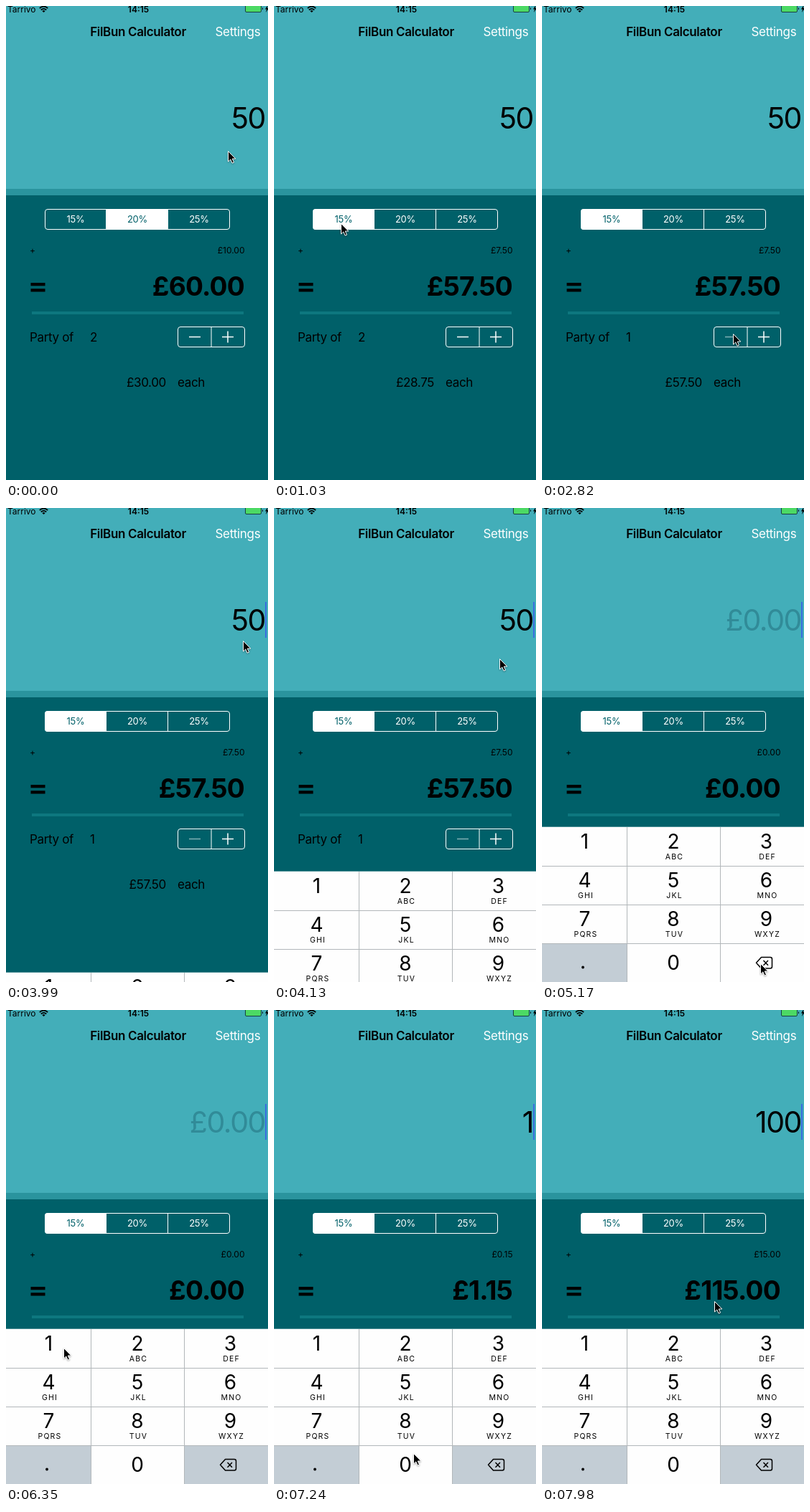
These frames come from a looping animation (365x661 px, 8 s). An HTML page:

```html
<!DOCTYPE html>
<html lang="en">
<head>
<meta charset="utf-8">
<title>Tip calculator</title>
<style>
  html, body { margin: 0; width: 100%; height: 100%; overflow: hidden; background: #006069; }
  svg { display: block; width: 365px; height: 661px; }
  text { font-family: Inter, Roboto, sans-serif; font-size: 17px; letter-spacing: -.02em; white-space: pre; }
  .small { font-size: 12px; letter-spacing: 0; }
  .semi { font-weight: 600; }
  .mid { text-anchor: middle; }
  .end { text-anchor: end; }
  .seg text { font-size: 13px; fill: #fff; }
  .seg .on rect { fill: #fff; }
  .seg .on text { fill: #006069; }
  .line { fill: none; stroke: #fff; }
  #bill { font-size: 41px; letter-spacing: -.035em; }
  #bill.empty { fill: #318b98; }
  .total { font-size: 37px; font-weight: 700; letter-spacing: -.02em; }
  .digit { font-size: 28px; letter-spacing: 0; }
  .abc { font-size: 10.5px; letter-spacing: 1.2px; }
  #cursor { filter: drop-shadow(0 1px 1px rgba(0, 0, 0, .35)); }
</style>
</head>
<body>
<svg viewBox="0 0 365 661">
  <defs><clipPath id="round"><rect x="54" y="283" width="258" height="29" rx="4"/></clipPath></defs>
  <rect width="365" height="661" fill="#006069"/>
  <rect width="365" height="255" fill="#43aeb9"/>
  <rect y="255" width="365" height="9" fill="#2a949e"/>

  <text class="small" x="2" y="8.5">Tarrivo</text>
  <g fill="none" stroke="#000" stroke-width="1.8">
    <path d="M46.8 3.2Q52.5 -2 58.2 3.2M48.8 5.5Q52.5 2.2 56.2 5.5"/>
    <path d="M52.5 9L50.4 6.9Q52.5 5.1 54.6 6.9Z" fill="#000" stroke="none"/>
  </g>
  <text class="small semi mid" x="184.5" y="8.5">14:15</text>
  <rect x="333.5" y="-1.5" width="22" height="10" rx="1.5" fill="#4cd964" stroke="#173f43"/>
  <path d="M357 2Q359 3.5 357 5.5ZM364.5 -1L361 4.5H363L362 9L366 3H364Z"/>
  <text class="semi mid" x="184" y="42">FilBun Calculator</text>
  <text x="291.5" y="42" fill="#fff">Settings</text>

  <text id="bill" class="end" x="361" y="171"></text>
  <rect id="caret" x="361" y="131" width="2" height="50" fill="#3a6ee0"/>

  <g class="seg" id="seg" clip-path="url(#round)"></g>
  <rect class="line" x="54.5" y="283.5" width="257" height="28" rx="3.5"/>
  <path class="line" d="M139.5 283V312M225.5 283V312"/>

  <text class="small" x="33" y="344.5">+</text>
  <text class="small end" id="tip" x="332.5" y="344.5"></text>
  <path d="M34.5 386H54.5V390.3H34.5ZM34.5 394.3H54.5V398.6H34.5Z"/>
  <text class="total end" id="total" x="332" y="403.5"></text>
  <rect x="36" y="426" width="295" height="4" fill="#0d777f"/>

  <text x="33" y="467.5">Party of</text>
  <text id="party" x="117" y="467.5"></text>
  <rect class="line" x="239.5" y="447.5" width="93" height="28" rx="3.5"/>
  <path class="line" d="M286 447V476"/>
  <path class="line" id="minus" d="M255 461.5H271" stroke-width="1.5"/>
  <path class="line" d="M301 461.5H317M309 453.5V469.5" stroke-width="1.5"/>
  <text class="end" id="share" x="223" y="531"></text>
  <text x="239" y="531">each</text>

  <g id="pad">
    <rect y="444.7" width="365" height="217" fill="#fefefe"/>
    <path d="M0 608H118V662H0Z" fill="#c3cdd5"/>
    <rect id="erase" x="249" y="608" width="117" height="54"/>
    <path d="M0 499.5H365M0 553.5H365M0 607.5H365M118.5 445V662M248.5 445V662" fill="none" stroke="#b2b7ba"/>
    <g id="keys"></g>
    <circle cx="57" cy="640.5" r="1.9"/>
    <path d="M305.5 626.5H318Q320.5 626.5 320.5 629V639.5Q320.5 642 318 642H305.5L298.5 634.3ZM308.5 631L315 637.7M315 631L308.5 637.7"
      fill="none" stroke="#000" stroke-width="1.5" stroke-linejoin="round"/>
  </g>

  <path id="cursor" d="M0 0V14.5L3.3 11.4L5.6 16.6L8 15.6L5.8 10.5H10.3Z" stroke="#fff"/>
</svg>
<script>
  const $ = id => document.getElementById(id);
  const LOOP = 8000, STEP = 147.75;
  const rates = [15, 20, 25];

  $('seg').innerHTML = rates.map((r, i) =>
    `<g><rect x="${54 + 86 * i}" y="283" width="86" height="29" fill="none"/>
     <text class="mid" x="${97 + 86 * i}" y="302">${r}%</text></g>`).join('');

  const cols = [59.5, 183, 312.5];
  const letters = ['', 'ABC', 'DEF', 'GHI', 'JKL', 'MNO', 'PQRS', 'TUV', 'WXYZ'];
  $('keys').innerHTML = letters.map((s, i) => {
    const x = cols[i % 3], y = 475 + 54 * Math.floor(i / 3);
    return `<text class="digit mid" x="${x}" y="${y}">${i + 1}</text>
      <text class="abc mid" x="${x + 1.5}" y="${y + 15}">${s}</text>`;
  }).join('') + '<text class="digit mid" x="183" y="644">0</text>';

  // Pointer legs: first step, last step, end point, optional bend point
  const legs = [
    [0, 6, 94, 302], [9, 15, 316, 459], [16, 18, 267, 456], [19, 23, 322, 217],
    [24, 26, 331, 184], [27, 33, 305, 634, 216, 351], [37, 43, 81, 470],
    [43, 45, 97, 470], [45, 49, 195, 617], [52, 54, 241, 405]
  ];

  function pointer(n) {
    let x = 310, y = 201;
    for (const [a, b, ex, ey, cx = (x + ex) / 2, cy = (y + ey) / 2] of legs) {
      if (n <= a) break;
      const p = Math.min(1, (n - a) / (b - a)), u = p * p * (3 - 2 * p), v = 1 - u;
      x = v * v * x + 2 * u * v * cx + u * u * ex;
      y = v * v * y + 2 * u * v * cy + u * u * ey;
    }
    return [Math.round(x) - .5, Math.round(y) + 1.5];
  }

  // Value of the last entry whose step has been reached
  const at = (list, n) => list.filter(e => e[0] <= n).pop()[1];
  const bills = [[0, '50'], [33, '5'], [35, ''], [44, '1'], [50, '10'], [51, '100']];
  const slides = [[0, 217], [27, 203], [28, 62], [29, 6], [30, .4], [31, 0]];
  const carets = [[0, 0], [26, 1], [31, 0], [33, 1], [39, 0], [42, 1], [46, 0], [49, 1]];
  const money = v => '£' + v.toFixed(2);

  let last = -1;
  function draw(n) {
    const bill = at(bills, n), rate = n < 7 ? 20 : 15, party = n < 19 ? 2 : 1;
    const tip = bill * rate / 100, total = +bill + tip;
    $('bill').textContent = bill || money(0);
    $('bill').classList.toggle('empty', !bill);
    $('tip').textContent = money(tip);
    $('total').textContent = money(total);
    $('party').textContent = party;
    $('share').textContent = money(total / party);
    $('minus').style.opacity = party > 1 ? 1 : .5;
    [...$('seg').children].forEach((g, i) => g.classList.toggle('on', rates[i] === rate));
    $('caret').style.opacity = at(carets, n);
    $('pad').setAttribute('transform', `translate(0 ${at(slides, n)})`);
    $('erase').setAttribute('fill', n === 33 || n === 35 ? '#fefefe' : '#c3cdd5');
    $('cursor').setAttribute('transform', `translate(${pointer(n)})`);
  }

  const start = performance.now();
  function tick() {
    const t = (performance.now() - start) % LOOP;
    const n = Math.floor((t + 8) / STEP);
    if (n !== last) draw(last = n);
    requestAnimationFrame(tick);
  }
  tick();
</script>
</body>
</html>
```
